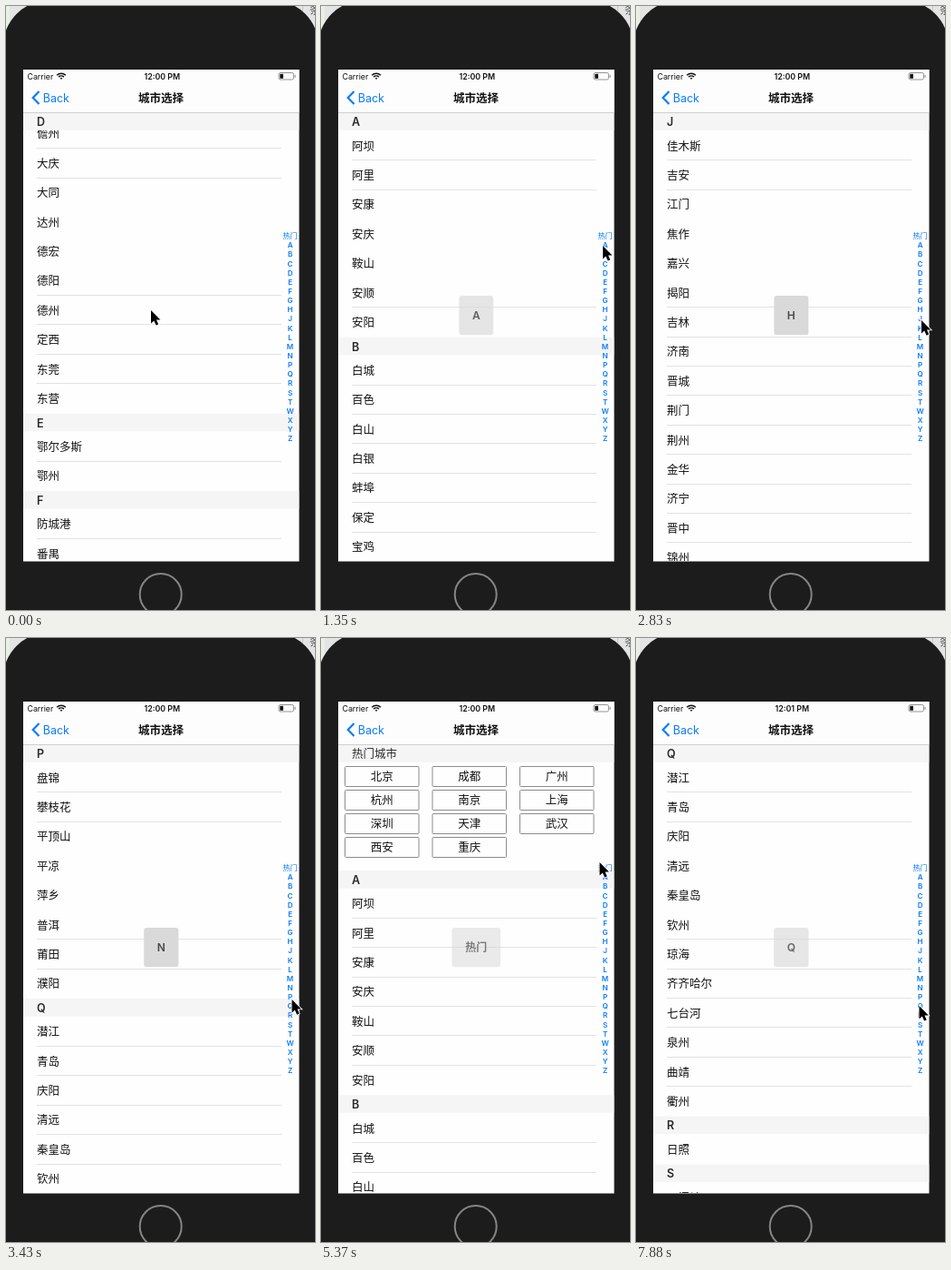
An HTML page with a canvas that plays this animation: 341 px wide and 665 px high, repeating every 8 s.

```html
<!DOCTYPE html>
<html lang="zh-CN">
<head>
<meta charset="utf-8">
<style>
html, body { margin: 0; width: 341px; height: 665px; overflow: hidden; }
canvas { display: block; }
</style>
</head>
<body>
<canvas id="stage" width="341" height="665"></canvas>
<script>
const g = document.getElementById('stage').getContext('2d');
const FONT = 'Inter, "Noto Sans CJK SC", "Noto Sans CJK", sans-serif';
const LOOP = 8000, BLUE = '#0a7cff';
const ROW = 32.385, HEAD = 20.6, HOT_H = 118, TOP = 117.3, BOTTOM = 611;

const HOT = '北京 成都 广州 杭州 南京 上海 深圳 天津 武汉 西安 重庆'.split(' ');
const CITIES = `
A 阿坝 阿里 安康 安庆 鞍山 安顺 安阳
B 白城 百色 白山 白银 蚌埠 保定 宝鸡 保山 包头 北海 北京 本溪 毕节 滨州 亳州
C 沧州 长春 常德 长沙 长治 常州 巢湖 朝阳 潮州 承德 成都 郴州 赤峰 池州 重庆 崇左 楚雄 滁州
D 大理 大连 丹东 儋州 大庆 大同 达州 德宏 德阳 德州 定西 东莞 东营
E 鄂尔多斯 鄂州
F 防城港 番禺 佛山 福清市 抚顺 阜新 阜阳 福州 抚州
G 赣州 广安 广元 广州 贵港 桂林 贵阳
H 哈尔滨 海口 海西 邯郸 杭州 汉中 鹤壁 河池 合肥 鹤岗 黑河 衡水 衡阳 河源 菏泽 贺州 淮安 淮北 怀化 淮南 黄山 黄石 惠州 湖州
J 佳木斯 吉安 江门 焦作 嘉兴 揭阳 吉林 济南 晋城 荆门 荆州 金华 济宁 晋中 锦州 九江 酒泉
K 开封 昆明 昆山
L 来宾 莱芜 廊坊 兰州 乐山 凉山 连云港 聊城 辽阳 丽江 临沂 丽水 柳州 六安 洛阳 泸州
M 马鞍山 茂名 眉山 梅州 绵阳 牡丹江
N 南昌 南充 南京 南宁 南平 南通 南阳 内江 宁波 宁德
P 盘锦 攀枝花 平顶山 平凉 萍乡 普洱 莆田 濮阳
Q 潜江 青岛 庆阳 清远 秦皇岛 钦州 琼海 齐齐哈尔 七台河 泉州 曲靖 衢州
R 日照
S 三门峡 三明 三亚 上海 商洛 商丘 上饶 汕头 汕尾 韶关 绍兴 邵阳 沈阳 深圳 石家庄 十堰 苏州 宿州
T 台州 泰安 太原 泰州 唐山 天津 天水 铁岭 通化 通辽 铜陵 铜仁
W 潍坊 威海 渭南 温州 武汉 芜湖 无锡 吴忠 梧州
X 厦门 西安 湘潭 襄阳 咸宁 咸阳 孝感 邢台 西宁 新乡 信阳 新余 徐州 许昌
Y 雅安 延安 盐城 阳江 扬州 烟台 宜宾 宜昌 宜春 银川 营口 益阳 永州 岳阳 玉林 运城 玉溪
Z 枣庄 张家界 张家口 张掖 漳州 湛江 肇庆 昭通 郑州 镇江 中山 舟山 周口 珠海 株洲 淄博 自贡 遵义`;

const sections = [{ key: '热门', title: '热门城市', rows: [] }];
for (const line of CITIES.trim().split('\n')) {
  const [key, ...rows] = line.split(' ');
  sections.push({ key, title: key, rows });
}
let total = 0;
sections.forEach((s, i) => {
  s.top = total;
  total += HEAD + (i ? s.rows.length * ROW : HOT_H);
});

// pointer path: time, x, y
const PATH = [
  [0, 160, 335], [150, 160, 335], [450, 270, 310], [700, 326, 285], [900, 309.5, 264],
  [1050, 311, 264], [1640, 311, 264], [1790, 312, 274], [2240, 314.5, 299],
  [2830, 315, 346], [3430, 315.5, 398], [3880, 317, 450], [4150, 316, 474],
  [4330, 316, 474], [5070, 307.5, 247], [5400, 307.5, 247], [5750, 322, 290],
  [6200, 316, 314], [6400, 314, 316], [6620, 314, 319], [6690, 313.5, 330.5],
  [7250, 313, 407], [7430, 312.5, 405], [LOOP, 312.5, 405]
];
// finger-down spans on the index bar
const TOUCHES = [[1150, 1250], [1790, 5230], [6250, 6620], [7730, 7770]];
const FADE = 300, LAG = 100;

function pointer(t) {
  const i = Math.max(1, PATH.findIndex(p => p[0] > t));
  const [a, b] = [PATH[i - 1], PATH[i]];
  const k = (t - a[0]) / (b[0] - a[0]);
  return [a[1] + (b[1] - a[1]) * k, a[2] + (b[2] - a[2]) * k];
}

function sectionAt(t) {
  const i = Math.floor((pointer(t)[1] - 260) / 10.14) + 1;
  return sections[Math.max(0, Math.min(sections.length - 1, i))];
}

const touchAt = t => TOUCHES.filter(s => s[0] <= t).pop();

function scrollAt(t) {
  const touch = touchAt(t);
  if (touch) return Math.min(sectionAt(Math.min(t, touch[1])).top, total - (BOTTOM - TOP));
  const from = sections[4].top + 108, to = sections[7].top + 101.3;
  return from + (to - from) * (1 - Math.exp(-t / 400)) / (1 - Math.exp(-900 / 400));
}

function text(s, x, cy, size = 12.5, color = '#111', weight = 400, align = 'left') {
  g.font = `${weight} ${size}px ${FONT}`;
  g.textAlign = align;
  g.fillStyle = color;
  g.fillText(s, x, cy + size * 0.365);
}

function rect(x, y, w, h, color) {
  g.fillStyle = color;
  g.fillRect(x, y, w, h);
}

function box(x, y, w, h, r) {
  g.beginPath();
  g.roundRect(x, y, w, h, r);
}

function stroke(color, width) {
  g.strokeStyle = color;
  g.lineWidth = width;
  g.stroke();
}

function phone() {
  rect(0, 0, 341, 665, '#e4e4e4');
  rect(0, 0, 4, 30, '#e9efe5');
  rect(327, 0, 1, 30, '#c8c8c8');
  text('条', 335, 5, 12, '#555');
  box(-3, -6, 348, 720, 50);
  g.fillStyle = '#1c1c1c';
  g.fill();
  g.beginPath();
  g.arc(170.7, 648, 23, 0, 7);
  stroke('#858585', 2);
  rect(19, 70, 304.5, 541.5, '#fefefe');
}

function header(s, y) {
  rect(19, y, 304.5, HEAD - 1, '#f5f5f5');
  text(s.title, 34, y + 10.4, 12.5, '#2a2a2a', s.key === s.title ? 600 : 400);
}

function hotCities(y) {
  HOT.forEach((name, i) => {
    const x = 26.5 + (i % 3) * 96.5, by = Math.round(y + Math.floor(i / 3) * 25.9) + 0.5;
    box(x, by, 81.5, 22, 1);
    stroke('#8c8c8c', 1);
    text(name, x + 40.7, by + 11.2, 12.5, '#111', 400, 'center');
  });
}

function list(scroll) {
  g.save();
  g.beginPath();
  g.rect(19, TOP, 304.5, BOTTOM - TOP);
  g.clip();
  sections.forEach((s, i) => {
    const y = TOP + s.top - scroll;
    const end = (i + 1 < sections.length ? sections[i + 1].top : total) + TOP - scroll;
    if (end < TOP || y > BOTTOM) return;
    if (!i) hotCities(y + HEAD + 3.2);
    s.rows.forEach((name, n) => {
      const ry = y + HEAD + n * ROW, line = ry + ROW;
      text(name, 34, ry + ROW / 2);
      // hairlines drop out in the upper band
      const hidden = line > 205 && line < 305;
      if (n < s.rows.length - 1 && !hidden) rect(34, Math.round(line) - 1, 270, 1, '#e2e2e2');
    });
    header(s, Math.min(Math.max(y, TOP), Math.max(y, end - HEAD)));
  });
  g.restore();
}

function bars(t) {
  rect(19, 70, 304.5, 47, '#fdfdfd');
  rect(19, 117, 304.5, 1, '#cfcfcf');
  text('Carrier', 23.5, 77.5, 8.8);
  text(t < 6550 ? '12:00 PM' : '12:01 PM', 172.3, 77.5, 8.8, '#111', 600, 'center');
  for (const r of [1.2, 4, 6.8]) {
    g.beginPath();
    g.arc(61, 81, r, -Math.PI * 0.75, -Math.PI * 0.25);
    stroke('#111', 1.6);
  }
  box(301, 73.5, 16.5, 7.5, 1.8);
  stroke('#888', 0.9);
  rect(302.3, 74.8, 3.6, 5, '#111');
  rect(318.6, 75.8, 1, 3, '#888');
  g.beginPath();
  g.moveTo(36.5, 94);
  g.lineTo(29.7, 101);
  g.lineTo(36.5, 108);
  stroke(BLUE, 2.2);
  text('Back', 40.7, 101, 12.5, BLUE);
  text('城市选择', 171, 101, 12.5, '#111', 700, 'center');
}

function indexBar() {
  sections.forEach((s, i) =>
    text(s.key, 313.6, 253.2 + i * 10.14, 8.1, BLUE, i ? 600 : 500, 'center'));
}

function bubble(t) {
  const touch = touchAt(t);
  if (!touch) return;
  const [start, end] = touch;
  const alpha = 1 - Math.max(0, t - end) / FADE;
  if (alpha <= 0) return;
  const label = sectionAt(Math.max(start, Math.min(t, end) - LAG)).key;
  g.font = `600 12.5px ${FONT}`;
  const w = g.measureText(label).width + 28.7;
  g.globalAlpha = alpha;
  box(171.3 - w / 2, 319, w, 43.3, 3);
  g.fillStyle = '#d9d9d9';
  g.fill();
  g.globalAlpha = Math.min(1, alpha * 1.3);
  text(label, 171.3, 341, 12, '#484848', 600, 'center');
  g.globalAlpha = 1;
}

const ARROW = new Path2D('M0 0V14.5L3.3 11.4 5.6 16.6 8.2 15.5 6 10.4H10.4Z');
function cursor(t) {
  g.save();
  g.translate(...pointer(t));
  stroke.call(null, 'transparent', 1);
  g.strokeStyle = '#fff';
  g.lineWidth = 1.6;
  g.stroke(ARROW);
  g.fillStyle = '#000';
  g.fill(ARROW);
  g.restore();
}

function draw(now) {
  const t = now % LOOP;
  phone();
  list(scrollAt(t));
  bars(t);
  indexBar();
  bubble(t);
  cursor(t);
  requestAnimationFrame(draw);
}
requestAnimationFrame(draw);
</script>
</body>
</html>
```
